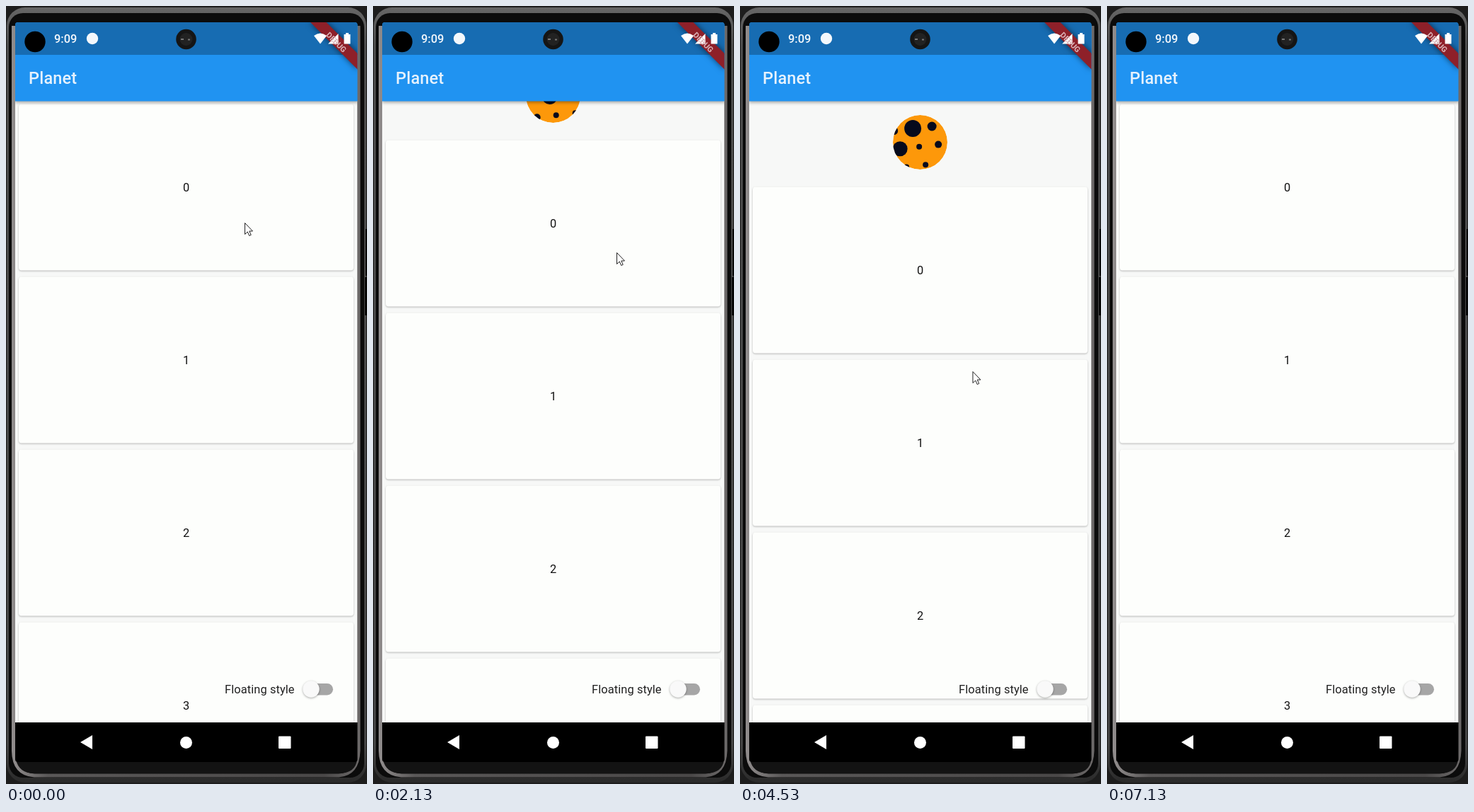
Write an HTML page that moves like this. It is 510 px wide and 1099 px high and loops after 7.19 s.

```html
<!DOCTYPE html>
<html lang="en">
<head>
<meta charset="utf-8">
<title>Planet</title>
<style>
  html, body { margin: 0; width: 100%; height: 100%; overflow: hidden; background: #1d1d1d; }
  svg { display: block; width: 510px; height: 1099px; font: 16.4px Roboto, sans-serif; }
  .card { fill: #fdfefc; filter: drop-shadow(0 1px 1px #0004); }
  .bar { filter: drop-shadow(0 2px 2px #0005); }
  .thumb { filter: drop-shadow(0 1.5px 1.5px #0005); }
  .banner { filter: drop-shadow(0 0 4px #0009); }
</style>
</head>
<body>
<svg viewBox="0 0 510 1099">
  <defs>
    <linearGradient id="shell" x2="0" y2="1">
      <stop stop-color="#666"/><stop offset=".05" stop-color="#4c4c4c"/>
      <stop offset=".95" stop-color="#444"/><stop offset="1" stop-color="#2a2a2a"/>
    </linearGradient>
    <linearGradient id="rim" x2="1" y2="0">
      <stop stop-color="#8f8b8b"/><stop offset=".1" stop-color="#5a5858"/>
      <stop offset=".9" stop-color="#4a4848"/><stop offset="1" stop-color="#6c6969"/>
    </linearGradient>
    <clipPath id="screen"><rect x="13" y="23" width="483.5" height="1045" rx="4"/></clipPath>
    <clipPath id="body"><rect x="13" y="134" width="483.5" height="878"/></clipPath>
    <clipPath id="disc"><circle r="38.5"/></clipPath>
  </defs>

  <!-- phone -->
  <rect x="1" y="2" width="508" height="1095" rx="26" fill="url(#shell)"/>
  <rect x="4" y="10" width="502" height="1080" rx="20" fill="#0b0b0b"/>
  <path d="M10.500 28V1052Q11 1085 40 1087H470Q497 1085 498 1052V28" fill="#0b0b0b" stroke="url(#rim)" stroke-width="5"/>
  <path d="M14 1064H496Q494 1084 470 1084H40Q18 1084 14 1064Z" fill="#131313"/>
  <path d="M508 315h2v66h-2zM507 383h3v54h-3z" fill="#050505"/>

  <g clip-path="url(#screen)">
    <g clip-path="url(#body)">
      <rect x="13" y="134" width="484" height="878" fill="#f7f8f7"/>
      <g id="scroll">
        <g transform="translate(254.5 75.5)" clip-path="url(#disc)">
          <circle r="38.5" fill="#fd980a"/>
          <g id="spots" fill="#060a1c"></g>
        </g>
        <g id="cards" text-anchor="middle"></g>
      </g>
      <text x="309" y="971" letter-spacing=".1" fill="#212121">Floating style</text>
      <rect x="426" y="957" width="36" height="16.5" rx="8.2" fill="#a6a6a6"/>
      <circle class="thumb" cx="431" cy="965" r="11.7" fill="#f9f9f9"/>
    </g>
    <rect class="bar" x="13" y="23" width="484" height="111.5" fill="#2093f1"/>
    <rect x="13" y="23" width="484" height="46" fill="#176cb2"/>
    <text x="32" y="110" font-size="23.5" font-weight="500" letter-spacing=".18" fill="#e6f2fd">Planet</text>
    <text x="68" y="52" font-weight="500" fill="#f4f8fc">9:09</text>
    <circle cx="122" cy="46" r="8.2" fill="#f4f8fc"/>
    <g class="banner"><path d="M430 23h22.500L497 67.500V90Z" fill="#8e2029"/></g>
    <g fill="#fff">
      <path d="M435 42Q444 35 453 42L444 53.500Z"/>
      <path d="M469.500 39V53.500H455Z"/>
      <path d="M477.500 40h2.500v-2h4v2h2.500v13.500h-9z"/>
    </g>
    <text transform="translate(464 54) rotate(45)" text-anchor="middle" font-size="11" font-weight="700" fill="#dcb4b8">DEBUG</text>
    <path d="M13 1012h484v56H13z"/>
    <g fill="#fff">
      <path d="M105 1040l17-10v20z"/>
      <circle cx="254.500" cy="1040.500" r="8.500"/>
      <rect x="385" y="1031.500" width="17.500" height="17.500" rx="1"/>
    </g>
    <circle cx="41" cy="50.500" r="14.700"/>
    <circle cx="254.500" cy="47" r="14.300" fill="#151515"/>
    <circle cx="254.500" cy="47" r="9" fill="#222"/>
    <path d="M247 47h4M257 47.500h3" stroke="#777" stroke-width="2"/>
  </g>

  <path id="cursor" d="M.5 .5V16.500L4.300 13 6.700 18.500 9.200 17.400 6.800 12H11.500Z" fill="#fff" stroke="#222"/>
</svg>
<script>
const LOOP = 7190, FPS = 15, SLOPE = .44;
const PITCH = 244, RELEASE = 3400, SPIN_START = 3792, RETURN = 6400;
const $ = id => document.getElementById(id);
const clamp = (v, lo, hi) => Math.min(hi, Math.max(lo, v));
const ease = p => p * p * (3 - 2 * p);
const range = n => [...Array(n).keys()];
const move = (id, x, y) => $(id).setAttribute('transform', `translate(${x} ${y})`);

// drag turning points: time, scroll offset, cursor x, cursor y
const drag = [
  [0, 0, 337, 306], [1270, 81, 329, 398], [2130, 51, 344, 348], [3130, 176, 347, 525],
  [RELEASE, 176, 347, 525], [4260, 117, 326.5, 516], [5200, 117, 336, 516]
];

// craters lie evenly along the rolling strip, scattered across it
const radii = [5, 6, 10.5, 4, 12, 4, 4, 6.5];
$('spots').innerHTML = range(35).map(i => {
  const x = 9 * i - 33;
  const across = 80 * ((.76 + .37 * i) % 1 - .5);
  return `<circle cx="${x}" cy="${across - SLOPE * x}" r="${radii[i % radii.length]}"/>`;
}).join('');

$('cards').innerHTML = range(4).map(i =>
  `<rect class="card" x="18" y="${138.5 + PITCH * i}" width="473" height="235" rx="4"/>
   <text x="254.5" y="${262 + PITCH * i}" fill="#111">${i}</text>`).join('');

function pose(t) {
  const next = drag.findIndex(k => k[0] > t);
  if (next < 0) return drag.at(-1).slice(1);
  const a = drag[next - 1], b = drag[next];
  const e = ease((t - a[0]) / (b[0] - a[0]));
  return a.map((v, n) => v + (b[n] - v) * e).slice(1);
}

// the planet rolls with the pull, then on its own while loading, with one short pause
function roll(t, y) {
  if (t < RELEASE) return .34 * (Math.min(y, 121) - 81);
  const spin = clamp(t, SPIN_START, 5730) - SPIN_START + clamp(t - 5930, 0, 200);
  return 13.6 + .0968 * spin;
}

function draw(now) {
  const t = Math.floor((now % LOOP + 4) * FPS / 1000) * 1000 / FPS % LOOP;
  const [pull, cx, cy] = pose(t);
  const y = pull * (1 - ease(clamp((t - RETURN) / 700, 0, 1)));
  const u = roll(t, y);
  move('scroll', 0, y);
  move('spots', -u, u * SLOPE);
  move('cursor', cx, cy);
  $('cursor').style.display = t < 5720 ? '' : 'none';
  requestAnimationFrame(() => draw(performance.now()));
}
draw(0);
</script>
</body>
</html>
```
